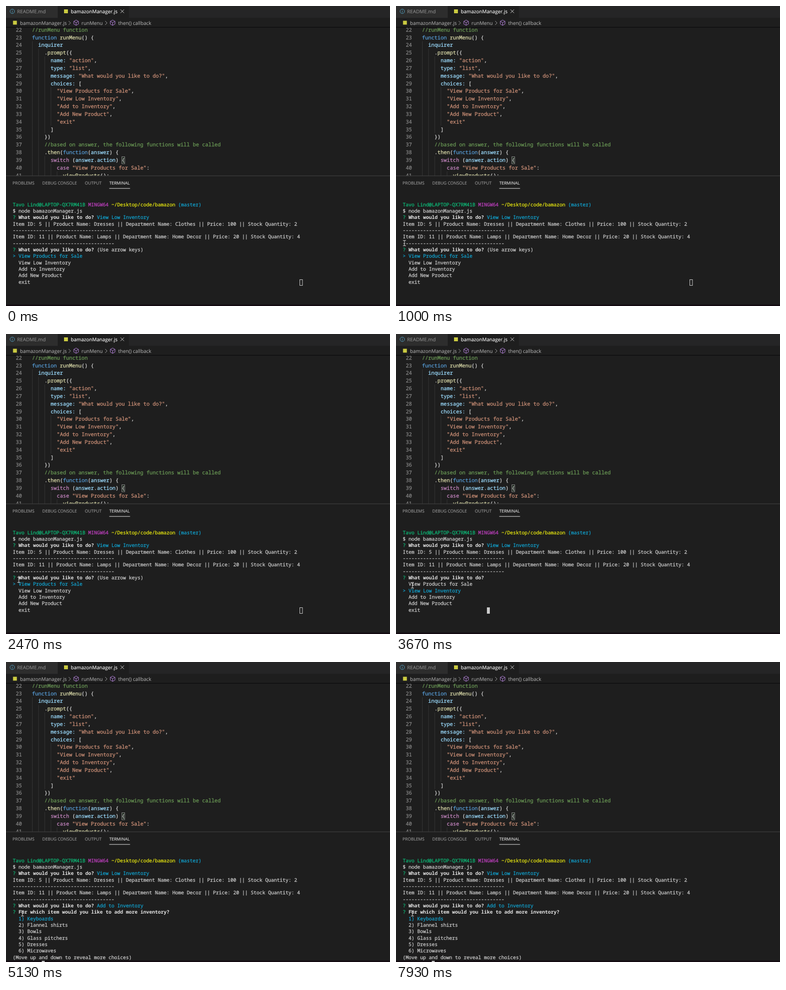
These frames come from a looping animation (794x620 px, 8 s). An HTML page:

```html
<!DOCTYPE html>
<html lang="en">
<head>
<meta charset="utf-8">
<title>Terminal session</title>
<style>
  html, body { margin: 0; width: 100%; height: 100%; overflow: hidden; background: #1e1e1e; }
  svg { display: block; width: 794px; height: 620px; }
  text { white-space: pre; text-rendering: geometricPrecision; }
  text, tspan { fill: currentColor; stroke: currentColor; stroke-width: 0.28px; }
  .code { font: 10.667px "Noto Sans Mono", "DejaVu Sans Mono", monospace; }
  .term { font: 10px "Noto Sans Mono", "DejaVu Sans Mono", monospace; }
  .ui { font: 10.2px "Open Sans", "Noto Sans", sans-serif; }
  .tabs { font: 8.75px "Open Sans", "Noto Sans", sans-serif; color: #9a9a9a; }
  .ui text, .tabs text { stroke-width: 0.12px; }
  .bold { font-weight: 700; stroke-width: 0; }
</style>
</head>
<body>
<svg viewBox="0 0 794 620">
  <defs>
    <clipPath id="editorClip"><rect y="44" width="794" height="307"/></clipPath>
    <g id="cube" fill="none" stroke="#b180d7">
      <path d="M0-5.5 4.8-2.8V2.8L0 5.5-4.8 2.8V-2.8ZM-4.8-2.8 0 0 4.8-2.8M0 0V5.5"/>
    </g>
    <path id="chevron" d="M-2-4 2 0-2 4" fill="none" stroke="#a0a0a0"/>
  </defs>
  <rect width="794" height="620" fill="#1e1e1e"/>

  <g id="editor" class="code" clip-path="url(#editorClip)"></g>

  <rect width="794" height="24.5" fill="#252526"/>
  <rect width="107" height="24.5" fill="#2d2d2d"/>
  <rect x="107" width="147" height="25" fill="#1e1e1e"/>
  <rect y="43" width="794" height="2" fill="#121213"/>
  <g class="ui">
    <circle cx="13" cy="11" r="4.6" fill="none" stroke="#519aba"/>
    <path d="M13 10.2V13.8M13 8V9.2" stroke="#519aba"/>
    <text x="23" y="15.3" color="#8f8f8f">README.md</text>
    <rect x="120" y="7" width="8" height="8" fill="#cbcb41"/>
    <text x="134" y="15.3" color="#fff">bamazonManager.js</text>
    <path d="M236.8 7.3 244 14.5M244 7.3 236.8 14.5" stroke="#d8d8d8"/>
    <rect x="14.5" y="30.5" width="8" height="8" fill="#cbcb41"/>
    <g color="#a9a9a9">
      <text x="29" y="38.6">bamazonManager.js</text>
      <text x="156" y="38.6">runMenu</text>
      <text x="232" y="38.6">then() callback</text>
    </g>
    <use href="#chevron" x="131.5" y="35"/>
    <use href="#cube" x="145" y="34.5"/>
    <use href="#chevron" x="207" y="35"/>
    <use href="#cube" x="220.5" y="34.5"/>
  </g>

  <rect y="350.5" width="794" height="1" fill="#454545"/>
  <g class="tabs">
    <text x="13.5" y="369.3">PROBLEMS</text>
    <text x="75" y="369.3">DEBUG CONSOLE</text>
    <text x="163" y="369.3">OUTPUT</text>
    <text x="213.7" y="369.3" color="#e7e7e7">TERMINAL</text>
  </g>
  <rect x="213.5" y="376.5" width="43" height="1" fill="#e7e7e7"/>

  <g id="terminal" class="term"></g>
  <rect y="617" width="794" height="3" fill="#140c12"/>

  <rect id="hollow" x="607.5" y="565.5" width="5.5" height="12" fill="none" stroke="#ccc"/>
  <rect id="solid" x="607" y="565" width="6.5" height="13" fill="#ccc"/>
  <rect id="moved" x="188" y="565" width="6" height="13" fill="#ccc"/>
  <rect id="low" x="74" y="617.7" width="6" height="2.3" fill="#ccc"/>
  <path id="pointer" d="M-3-5.5H-1L0-5 1-5.5H3M0-5V5M-3 5.5H-1L0 5 1 5.5H3" fill="none" stroke="#e4e4e4"/>
</svg>

<script>
const LOOP = 8000;
const NS = 'http://www.w3.org/2000/svg';
const byId = id => document.getElementById(id);

const COLORS = {
  '#': '#6a9955', k: '#569cd6', f: '#dcdcaa', v: '#9cdcfe', s: '#ce9178', p: '#d4d4d4', c: '#c586c0', n: '#858585',
  g: '#0dbc79', m: '#bc3fbc', y: '#e5e510', b: '#11a3d0', w: '#cccccc', B: '#e5e5e5'
};

function add(parent, tag, attrs = {}) {
  const el = document.createElementNS(NS, tag);
  for (const key in attrs) el.setAttribute(key, attrs[key]);
  parent.append(el);
  return el;
}

// Runs alternate colour key and text; key B is bold.
function line(parent, x, y, runs) {
  const text = add(parent, 'text', { x, y });
  for (let i = 0; i < runs.length; i += 2) {
    const span = add(text, 'tspan', { color: COLORS[runs[i]] });
    if (runs[i] === 'B') span.setAttribute('class', 'bold');
    span.textContent = runs[i + 1];
  }
}

// Each entry: indent in levels, then coloured runs.
const code = [
  [0, '#', '//runMenu function'],
  [0, 'k', 'function ', 'f', 'runMenu', 'p', '() {'],
  [1, 'v', 'inquirer'],
  [2, 'p', '.', 'f', 'prompt', 'p', '({'],
  [3, 'v', 'name: ', 's', '"action"', 'p', ','],
  [3, 'v', 'type: ', 's', '"list"', 'p', ','],
  [3, 'v', 'message: ', 's', '"What would you like to do?"', 'p', ','],
  [3, 'v', 'choices: ', 'p', '['],
  [4, 's', '"View Products for Sale"', 'p', ','],
  [4, 's', '"View Low Inventory"', 'p', ','],
  [4, 's', '"Add to Inventory"', 'p', ','],
  [4, 's', '"Add New Product"', 'p', ','],
  [4, 's', '"exit"'],
  [3, 'p', ']'],
  [2, 'p', '})'],
  [2, '#', '//based on answer, the following functions will be called'],
  [2, 'p', '.', 'f', 'then', 'p', '(', 'k', 'function', 'p', '(', 'v', 'answer', 'p', ') {'],
  [3, 'c', 'switch ', 'p', '(', 'v', 'answer', 'p', '.', 'v', 'action', 'p', ') {'],
  [4, 'c', 'case ', 's', '"View Products for Sale"', 'p', ':'],
  [5, 'f', 'viewProducts', 'p', '();']
];

const editor = byId('editor');
add(editor, 'rect', { x: 239.5, y: 311.5, width: 6, height: 14.5, fill: '#1c261c', stroke: '#888' });
code.forEach(([indent, ...runs], i) => {
  const y = 52.8 + i * 15.83;
  for (let g = 0; g < indent; g++)
    add(editor, 'rect', { x: 54 + g * 12.8, y: y - 11.8, width: 0.9, height: 15.9, fill: '#383838' });
  line(editor, 20.2, y, ['n', String(22 + i)]);
  line(editor, 53.8 + indent * 12.8, y, runs);
});

const terminal = byId('terminal');
const row = (group, n, ...runs) => line(group, 14, 413.7 + n * 13.333, runs);
const QUESTION = ['g', '? ', 'B', 'What would you like to do? '];
const dashes = '-'.repeat(35);
const item = (id, name, dept, price, qty) =>
  `Item ID: ${id} || Product Name: ${name} || Department Name: ${dept} || Price: ${price} || Stock Quantity: ${qty}`;

[
  ['g', 'Tavo Lind@LAPTOP-QX7RM41B ', 'm', 'MINGW64 ', 'y', '~/Desktop/code/bamazon ', 'b', '(master)'],
  ['w', '$ node bamazonManager.js'],
  [...QUESTION, 'b', 'View Low Inventory'],
  ['w', item(5, 'Dresses', 'Clothes', 100, 2)],
  ['w', dashes],
  ['w', item(11, 'Lamps', 'Home Decor', 20, 4)],
  ['w', dashes]
].forEach((runs, n) => row(terminal, n, ...runs));

const actions = ['View Products for Sale', 'View Low Inventory', 'Add to Inventory', 'Add New Product', 'exit'];

function menu(selected) {
  const group = add(terminal, 'g');
  row(group, 7, ...QUESTION, 'w', selected ? '' : '(Use arrow keys)');
  actions.forEach((name, i) =>
    row(group, 8 + i, i === selected ? 'b' : 'w', (i === selected ? '> ' : '  ') + name));
  return group;
}

function itemList() {
  const group = add(terminal, 'g');
  row(group, 7, ...QUESTION, 'b', 'Add to Inventory');
  row(group, 8, 'g', '? ', 'B', 'For which item would you like to add more inventory?');
  ['Keyboards', 'Flannel shirts', 'Bowls', 'Glass pitchers', 'Dresses', 'Microwaves'].forEach((name, i) =>
    row(group, 9 + i, i ? 'w' : 'b', `  ${i + 1}) ${name}`));
  row(group, 15, 'w', '(Move up and down to reveal more choices)');
  return group;
}

const FOCUS = 2670, DOWN = 3400, DOWN_AGAIN = 4200, ENTER = 4670, LISTED = 4800;
const timing = { duration: LOOP, iterations: Infinity };

function show(el, from, to) {
  const frames = [[0, from ? 0 : 1], [from, 1], [to, to < LOOP ? 0 : 1], [LOOP, to < LOOP ? 0 : 1]];
  el.animate(frames.map(([t, opacity]) => ({ offset: t / LOOP, opacity, easing: 'steps(1, end)' })), timing);
}

show(menu(0), 0, DOWN);
show(menu(1), DOWN, DOWN_AGAIN);
show(menu(2), DOWN_AGAIN, ENTER);
show(itemList(), LISTED, LOOP);
show(byId('hollow'), 0, FOCUS);
show(byId('solid'), FOCUS, DOWN);
show(byId('moved'), DOWN, ENTER);
show(byId('low'), LISTED, LOOP);

// Pointer path: time, x, y
byId('pointer').animate([
  [0, -8, 482], [300, -8, 482], [870, 17.5, 490], [1070, 17.5, 490],
  [1730, 26.5, 508], [2530, 26.5, 508], [2870, 34, 519.5], [LOOP, 34, 519.5]
].map(([t, x, y]) => ({
  offset: t / LOOP, transform: `translate(${x}px, ${y}px)`, easing: 'ease-in-out'
})), timing);
</script>
</body>
</html>
```
